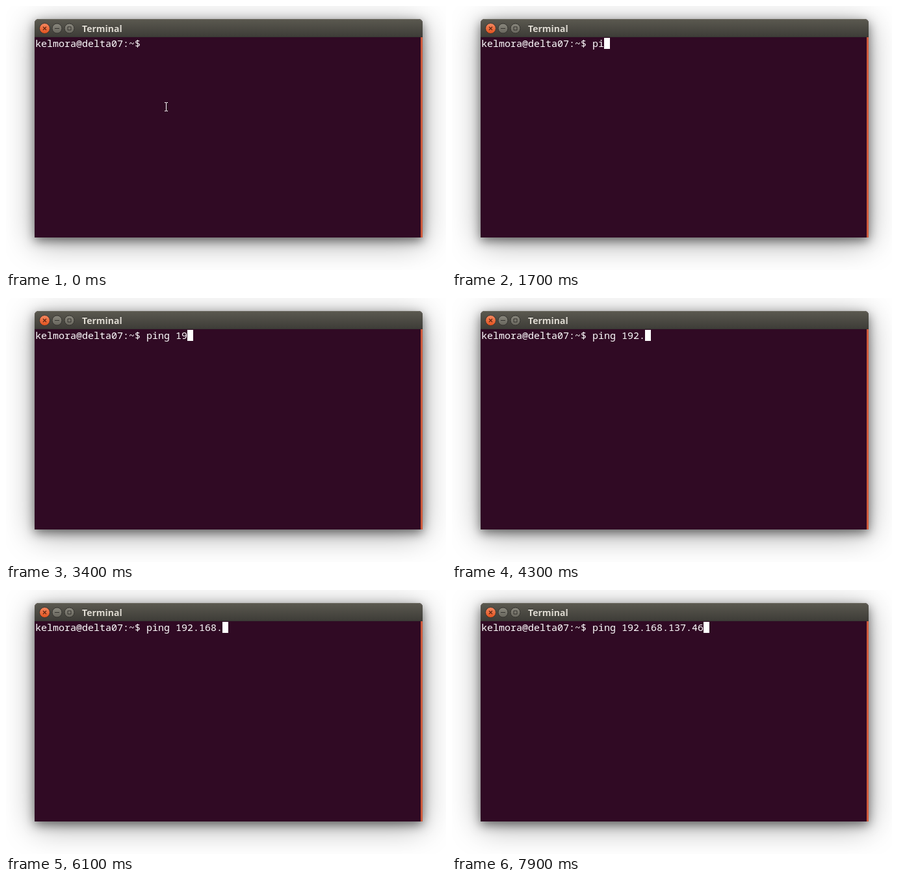
Animation of 677 by 406 pixels, one loop 8000 ms. Source, as an HTML page:

```html
<!DOCTYPE html>
<html lang="en">
<head>
<meta charset="utf-8">
<title>Terminal</title>
<style>
  html, body { margin: 0; width: 677px; height: 406px; overflow: hidden; background: #fff; }
  .window {
    position: absolute; left: 44px; top: 20px; width: 597px; height: 336px;
    border-radius: 6px 6px 0 0; background: #300a24;
    box-shadow: 0 8px 48px rgba(0, 0, 0, .36), 0 5px 16px rgba(0, 0, 0, .5);
  }
  .bar {
    height: 28px; box-sizing: border-box; border-radius: 6px 6px 0 0;
    background: linear-gradient(#5b5950, #3d3c37);
    box-shadow: inset 0 1px #6b695f, inset 0 -1px #383733;
  }
  .title {
    position: absolute; left: 73px; top: 5px;
    font: bold 14px/19px "Noto Sans", "Open Sans", sans-serif;
    color: #dfdbd2; text-shadow: 0 -1px #33322e;
  }
  .buttons { position: absolute; left: 0; top: 0; }
  .scroll { position: absolute; right: 0; top: 28px; width: 3px; height: 308px; background: #d05c3d; }
  .line {
    position: absolute; left: 1px; top: 29px; display: flex;
    font: 15px/17px "Noto Sans Mono", "DejaVu Sans Mono", monospace;
    color: #fff; white-space: pre;
  }
  #cursor { width: 9px; height: 17px; background: #fff; }
  #pointer { position: absolute; left: 243px; top: 147px; }
</style>
</head>
<body>
<div class="window">
  <div class="bar"></div>
  <svg class="buttons" width="70" height="28" fill="none">
    <defs>
      <linearGradient id="orange" x2="0" y2="1">
        <stop stop-color="#f58a62"/><stop offset="1" stop-color="#e2511d"/>
      </linearGradient>
      <linearGradient id="gray" x2="0" y2="1">
        <stop stop-color="#8a887e"/><stop offset="1" stop-color="#67655c"/>
      </linearGradient>
    </defs>
    <g stroke="#34332f">
      <circle cx="15.5" cy="14.5" r="8" fill="url(#orange)"/>
      <circle cx="34.5" cy="14.5" r="7.5" fill="url(#gray)"/>
      <circle cx="53.5" cy="14.5" r="7.5" fill="url(#gray)"/>
      <path d="M13 12l5 5m0-5l-5 5" stroke="#5b2412" stroke-width="1.2"/>
      <path d="M31 14.5h7M51 12h5v5h-5z"/>
    </g>
  </svg>
  <div class="title">Terminal</div>
  <div class="line"><span>kelmora@delta07:~$ </span><span id="typed"></span><span id="cursor"></span></div>
  <div class="scroll"></div>
</div>
<svg id="pointer" width="8" height="16" fill="none">
  <path d="M1 1.5h2l.5.5.5-.5h2M3.5 2v12M1 14.5h2l.5-.5.5.5h2" stroke="#fff"/>
</svg>
<script>
  const LOOP = 8000;
  const COMMAND = 'ping 192.168.137.46';
  const keyTimes = [1600, 1700, 1800, 2000, 3000, 3200, 3400, 3500, 4300, 5000,
                    5200, 5300, 6100, 6700, 7000, 7200, 7400, 7700, 7900];
  const blinkTimes = [300, 900, 1500, 2600, 2900, 4100, 4300, 5900, 6100];

  const el = id => document.getElementById(id);
  const typed = el('typed'), cursor = el('cursor'), pointer = el('pointer');
  const passed = (times, t) => times.filter(x => x <= t).length;
  const show = (node, on) => { node.style.visibility = on ? 'visible' : 'hidden'; };

  function draw() {
    const t = performance.now() % LOOP;
    const count = passed(keyTimes, t);
    typed.textContent = COMMAND.slice(0, count);
    show(cursor, passed(blinkTimes, t) % 2);
    show(pointer, count === 0); // typing hides the mouse
    requestAnimationFrame(draw);
  }
  draw();
</script>
</body>
</html>
```
